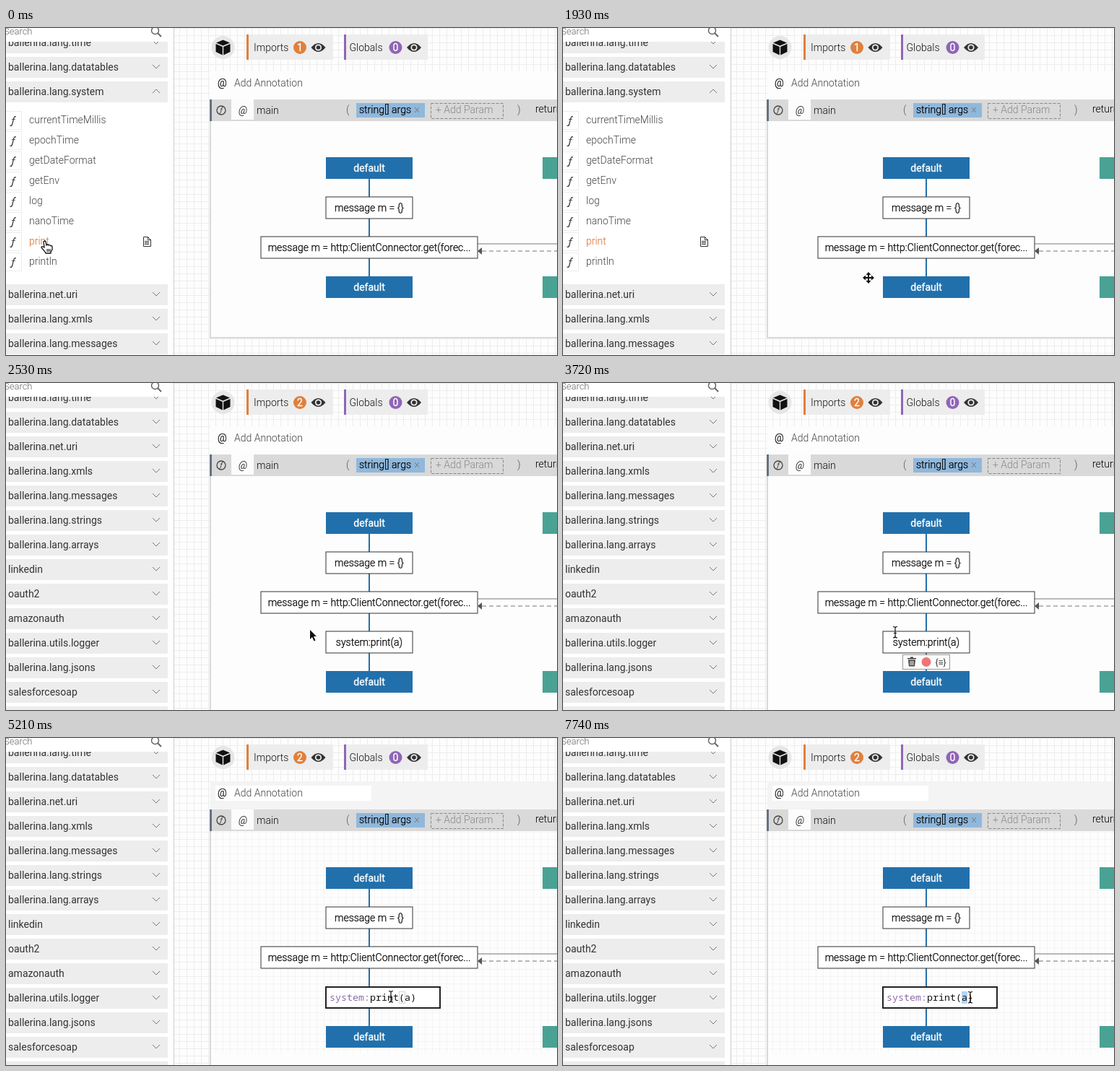
Animation of 763 by 453 pixels, one loop 8 s. Source, as an HTML page:

```html
<!DOCTYPE html>
<html lang="en">
<head>
<meta charset="utf-8">
<title>Diagram editor</title>
<style>
html, body { margin: 0; width: 100%; height: 100%; overflow: hidden; background: #fff; }
svg { display: block; }
text { font: 300 14px Roboto, sans-serif; fill: #333; white-space: pre; }
.row { font-weight: 400; }
.mid { text-anchor: middle; }
.dark { fill: #000; stroke: #000; stroke-width: .25; }
.white { fill: #fff; font-weight: 400; stroke: #fff; stroke-width: .3; }
.code { font: 13.33px "Noto Sans Mono", monospace; fill: #111; }
.line { fill: none; stroke: #777; }
</style>
</head>
<body>
<svg id="stage" width="763" height="453" viewBox="0 0 763 453"></svg>
<script>
const LOOP = 8000;
const BLUE = '#2270ab', TEAL = '#4aa295', ORANGE = '#e0803c', PURPLE = '#9065b8';

const rect = (x, y, w, h, fill, more = '') =>
  `<rect x="${x}" y="${y}" width="${w}" height="${h}" fill="${fill}" ${more}/>`;
const text = (x, y, s, cls = '', more = '') => `<text x="${x}" y="${y}" class="${cls}" ${more}>${s}</text>`;
const path = (d, more = '') => `<path d="${d}" class="line" ${more}/>`;
const circle = (x, y, r, fill, more = '') => `<circle cx="${x}" cy="${y}" r="${r}" fill="${fill}" ${more}/>`;
const group = (id, s) => `<g id="${id}">${s}</g>`;

// slanted f sign, 32 by 52 units
const fSign = (x, y, size) => `<g transform="translate(${x} ${y}) scale(${size})">` +
  path('M30 5Q27 0 23 4Q19 9 17 20L13 37Q10 50 4 50Q1 50 2 47', 'style="stroke:#333;stroke-width:4.5"') +
  path('M9 17H27', 'style="stroke:#333;stroke-width:3"') + '</g>';

// sidebar
const row = (y, label, open) => rect(0, y - 14, 224, 29, '#ededed') + text(3, y + 5, label, 'row') +
  path(open ? `M203 ${y + 2}l5-5 5 5` : `M203 ${y - 3}l5 5 5-5`);
const rows = (y, names) => names.map((n, i) => row(y + 34 * i, n)).join('');
const lang = s => s.split(' ').map(n => 'ballerina.lang.' + n);
const fnRow = (name, i) => {
  const y = 128 + 28 * i;
  return rect(-9.5, y - 12.5, 31, 25, '#fff', 'stroke="#ececec"') + fSign(5.5, y - 6, .27) +
    text(32, y + 4, name, '', `style="fill:#444" id="fn-${name}"`);
};
const fns = 'currentTimeMillis epochTime getDateFormat getEnv log nanoTime print println'.split(' ');
const docIcon = group('doc',
  path('M190.5 289.5h6l4 4v9h-10zM196.5 289.5v4h4M192 295.5h6M192 297.5h6M192 299.5h6', 'style="stroke:#333"'));
const sidebar = rect(0, 0, 232, 453, '#fff') + rows(20, lang('time datatables')) +
  group('listOpen', row(88, 'ballerina.lang.system', true) + fns.map(fnRow).join('') + docIcon +
    rows(369, ['ballerina.net.uri', ...lang('xmls messages')])) +
  group('listShut', rows(88, ['ballerina.net.uri', ...lang('xmls messages strings arrays'), 'linkedin',
    'oauth2', 'amazonauth', 'ballerina.utils.logger', 'ballerina.lang.jsons', 'salesforcesoap', ''])) +
  rect(0, 0, 232, 19, '#fff') + text(-3, 9, 'Search', '', 'style="fill:#666;font-size:13px"') +
  circle(206.5, 3.5, 5, 'none', 'stroke="#666" stroke-width="1.5"') + path('M210 7l5 5', 'style="stroke:#666;stroke-width:2"') +
  rect(232, 0, 1, 453, '#ccc');

// top bar
const eye = x => `<path d="M${x - 10} 27q10-12 20 0q-10 12-20 0z" fill="#333"/>` +
  circle(x, 27, 4.6, '#ededed') + circle(x, 27, 2.8, '#333');
const tab = (x, w, label, color, badgeX, count, id) => rect(x, 9, w, 35, '#ededed') + rect(x, 9, 3, 35, color) +
  text(badgeX - 64, 32, label, '', 'style="fill:#111"') + circle(badgeX, 27, 9, color) +
  text(badgeX, 32, count, 'mid white', `id="${id}"`) + eye(badgeX + 25.5);
const topBar = circle(300.5, 27, 16, '#e6e6e6') +
  '<path d="M300.5 16.5l9.5 4-9.5 4-9.5-4zM290.5 22l9.3 4v11.5l-9.3-4.5zM310.5 22l-9.3 4v11.5l9.3-4.5z" fill="#111"/>' +
  tab(333, 120, 'Imports', ORANGE, 407, 1, 'imports') + tab(468, 116, 'Globals', PURPLE, 539.5, 0, 'globals');

// function panel
const panel = rect(283, 60, 480, 424, '#fdfdfd', 'id="sheet"') +
  rect(283, 60, 480, 376, 'url(#faint)', 'id="sheetGrid"') +
  rect(282, 129, 2, 356, '#d9d9d9', 'id="side"') + rect(282, 428, 481, 2, '#d9d9d9', 'id="bottom"') +
  group('noteBand', rect(283, 60, 480, 39, '#f4f4f4') + rect(290, 66, 216, 21, '#fff')) +
  text(293, 81, '@', 'dark') + text(316, 81, 'Add Annotation', '', 'style="fill:#444"') +
  rect(283, 99, 480, 30, '#d9d9d9') + rect(282, 99, 3, 30, '#637282') + rect(312, 99, 31, 28, '#fcfcfc') +
  circle(298, 114, 6, 'none', 'stroke="#444" stroke-width="1.3"') + fSign(295, 109, .19) +
  text(328, 119, '@', 'mid', 'style="font-style:italic;font-weight:400"') +
  text(347, 119, 'main', '', 'style="fill:#111"') + text(471, 118, '(', '', 'style="fill:#555"') +
  rect(485, 104, 95, 20, '#90b8dc') + text(489, 118, 'string[] args', 'dark') + path('M566 110l6 7m0-7l-6 7') +
  rect(588.5, 104.5, 100, 21, 'none', 'stroke="#888" stroke-dasharray="4 2"') +
  text(595, 118, '+ Add Param', '', 'style="fill:#888"') + text(708, 118, ')', '', 'style="fill:#555"') +
  text(733, 117, 'returns', '', 'style="fill:#000"');

// diagram
const block = (y, id) => group(id, rect(443, y, 120, 30, BLUE) + text(503, y + 20, 'default', 'mid white') +
  rect(743, y, 20, 30, TEAL));
const step = (x, y, w, label) => rect(x, y, w, 30, '#fff', 'stroke="#333"') +
  text(x + w / 2, y + 20, label, 'mid dark');
const trash = '<path d="M477 381h12v1.5h-12zM481 379.5h4v1.5h-4zM478 383.5h10l-1 9h-8z" fill="#444"/>' +
  path('M481 385v6M483 385v6M485 385v6', 'style="stroke:#fff"');
const diagram = rect(502, 205, 2, 200, BLUE, 'id="spine"') +
  group('drop', rect(333, 209, 340, 135, 'rgba(90,160,80,.28)') + rect(333, 209, 340, 135, 'url(#faint)')) +
  block(179, 'start') + block(344, 'end') +
  step(443, 234, 120, 'message m = {}') +
  path('M653 299H763') + path('M659 309H763', 'stroke-dasharray="6 4"') +
  '<path d="M653 309l6-5v10z" fill="#555"/>' +
  step(353, 289, 300, 'message m = http:ClientConnector.get(forec...') +
  group('call', step(443, 344, 120, 'system:print(a)')) +
  group('tools', rect(470.5, 376.5, 65, 20, '#fcfcfc', 'stroke="#999"') + trash + circle(503, 386.5, 6.5, '#f07575') +
    text(523, 390.5, '{≡}', 'mid', 'style="font-size:12px;font-weight:400"')) +
  group('editor', rect(443, 345, 158, 29, '#fff', 'stroke="#222" stroke-width="2"') +
    rect(552, 351, 8, 17, '#b5d5f5', 'id="selection"') +
    rect(544.5, 351.5, 8, 16, 'none', 'stroke="#d5d5d5" id="bracket"') +
    text(448, 364, '<tspan fill="#8c6ba6">system:</tspan>print(a)', 'code') +
    rect(552, 351, 1, 17, '#111', 'id="caret"')) +
  group('dragged', fSign(389, 346, 1));

// cursors, each with its hot spot at 0,0
const outline = 'stroke="#fff" stroke-width="1" paint-order="stroke"';
const cursors =
  group('hand', '<path d="M-3-6q2-2 3 0l1 5q2-2 3 0q2-1 3 1q2-1 2 1v4l-2 3v2h-7l-1-2-5-6q0-2 2-1l2 1z" fill="#fff" stroke="#111" stroke-width="1.3"/>' +
    path('M2 4v4M4 4v4M6 4v4', 'style="stroke:#111"')) +
  group('move', `<path d="M0-8l3.5 4H1v3h3v-2.5L8 0 4 3.5V1H1v3h2.5L0 8l-3.5-4H-1V1h-3v2.5L-8 0l4-3.5V-1h3v-3h-2.5z" fill="#111" ${outline}/>`) +
  group('arrow', `<path d="M0 0v13l3-3 2.5 5.5 2-1L5 9h4z" fill="#111" ${outline}/>`) +
  group('beam', path('M-3-7.5q3 0 3 2V6q0 2-3 2M3-7.5q-3 0-3 2V6q0 2 3 2M-2 1.5h4', 'style="stroke:#111;stroke-width:1.2"'));

const grid = (id, color) => `<pattern id="${id}" width="10" height="10" patternUnits="userSpaceOnUse">` +
  `<path d="M.5 0V10M0 .5H10" stroke="${color}" fill="none"/></pattern>`;

const stage = document.getElementById('stage');
stage.innerHTML = '<defs>' + grid('grid', '#ededed') + grid('faint', 'rgba(0,0,0,.03)') + '</defs>' +
  rect(232, 0, 531, 453, '#fdfdfd') + rect(232, 0, 531, 453, 'url(#grid)') +
  panel + topBar + sidebar + diagram + group('cursor', cursors);

const $ = id => document.getElementById(id);
const show = (id, on) => $(id).style.display = on ? '' : 'none';

// pointer stops: start time, x, y, shape
const stops = [
  [0, 55, 302, 'hand'],
  [1050, 150, 311, 'move'], [1200, 250, 322, 'move'], [1340, 311, 329, 'move'],
  [1640, 362, 338, 'move'], [1780, 402, 344, 'move'], [1930, 423, 346, 'move'], [2080, 421, 343, 'move'],
  [2530, 421, 342, 'arrow'], [2680, 431, 340, 'arrow'], [2830, 438, 338, 'arrow'],
  [3720, 460, 345, 'beam'], [3870, 490, 352, 'beam'], [4020, 515, 356, 'beam'], [4170, 528, 358, 'beam'],
  [4320, 533, 358, 'beam'], [5360, 538, 359, 'beam'], [5510, 545, 359, 'beam'], [5660, 551, 359, 'beam'],
  [5800, 555, 359, 'beam'], [5950, 561, 359, 'beam'], [6100, 567, 359, 'beam'], [6400, 564, 359, 'beam']
];

function draw(t) {
  const [, x, y, shape] = stops.findLast(s => t >= s[0]);
  $('cursor').setAttribute('transform', `translate(${x} ${y})`);
  for (const id of ['hand', 'move', 'arrow', 'beam']) show(id, id === shape);

  const hover = t < 2080, added = t >= 2530, editing = t >= 5210;
  show('listOpen', !added);
  show('listShut', added);
  show('doc', hover);
  $('fn-print').style.fill = hover ? '#d9692a' : '#444';
  $('imports').textContent = added ? 2 : 1;

  const dragging = t >= 2230 && !added;
  show('drop', dragging);
  show('dragged', dragging);

  const shift = added ? 55 : 0;
  $('end').setAttribute('transform', `translate(0 ${shift})`);
  $('bottom').setAttribute('y', 428 + shift);
  $('sheet').setAttribute('height', 369 + shift);
  $('side').setAttribute('height', 300 + shift);
  $('spine').setAttribute('height', 150 + shift);

  show('call', added && !editing);
  show('tools', t >= 3720 && !editing);
  show('editor', editing);
  show('sheetGrid', editing);
  show('noteBand', editing);
  show('bracket', t < 6400);
  show('selection', t >= 7000);
  show('caret', t >= 7290 && t < 7740);
}

function tick() {
  draw(performance.now() % LOOP);
  requestAnimationFrame(tick);
}
tick();
</script>
</body>
</html>
```
